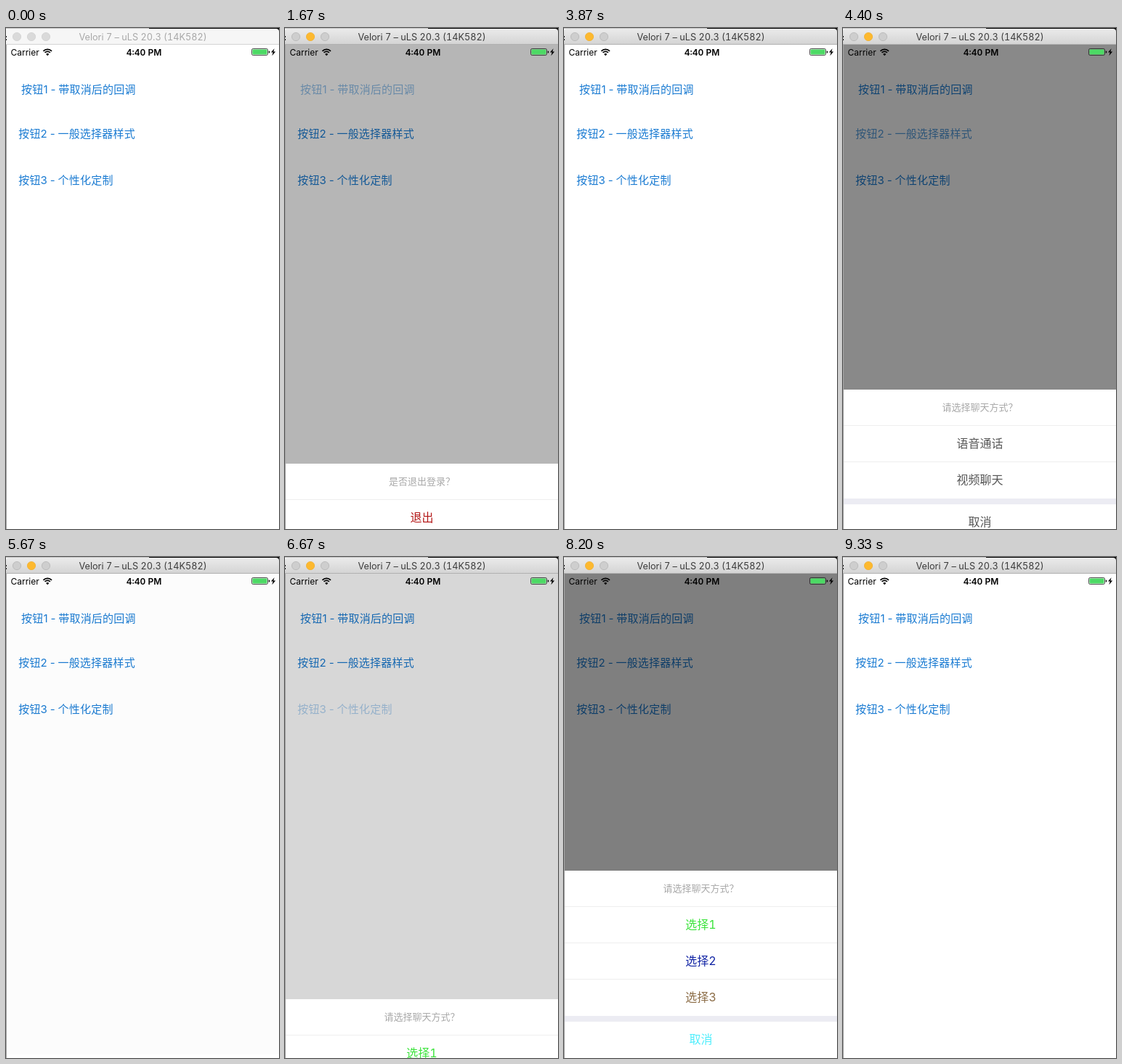
Recreate the animation shown at these times as an HTML page. Size 376 by 690 pixels, loop 9.39 s.

```html
<!DOCTYPE html>
<html lang="zh-CN">
<head>
<meta charset="utf-8">
<title>Action sheets</title>
<style>
html, body { margin: 0; width: 100%; height: 100%; overflow: hidden; background: #fff; }
svg { display: block; width: 376px; height: 690px; }
text { font-family: Inter, "Noto Sans CJK SC", "Noto Sans CJK", sans-serif; font-variant-numeric: tabular-nums; white-space: pre; }
.btn { font-size: 15px; fill: #1a7bd2; font-variant-numeric: normal; letter-spacing: 0.2px; word-spacing: -0.7px; }
.mid { text-anchor: middle; }
.head { font-size: 13px; fill: #a9a9a9; }
.row { font-size: 16px; }
</style>
</head>
<body>
<svg id="stage" viewBox="0 0 376 690" xmlns="http://www.w3.org/2000/svg">
  <defs>
    <linearGradient id="barOn" x2="0" y2="1">
      <stop offset="0" stop-color="#ebebeb"/><stop offset="1" stop-color="#d3d3d3"/>
    </linearGradient>
  </defs>
  <rect width="376" height="690" fill="#fff"/>

  <g id="buttons"></g>
  <rect id="dim" x="1" y="22" width="375" height="668" fill="#000" opacity="0"/>

  <g id="status">
    <text x="6.5" y="37.5" font-size="12">Carrier</text>
    <g fill="none" stroke="#000" stroke-width="1.7">
      <path d="M51.4 31.8a8.1 8.1 0 0 1 11.6 0"/>
      <path d="M53.5 34a5.2 5.2 0 0 1 7.4 0"/>
    </g>
    <path d="M57.2 38.2l-2.1-2.2a3 3 0 0 1 4.2 0z"/>
    <text class="mid" x="190" y="37.5" font-size="12" font-weight="600">4:40 PM</text>
    <rect x="338.5" y="28.5" width="22" height="9" rx="1.8" fill="none" stroke="#222" stroke-width="0.8"/>
    <rect x="339.5" y="29.5" width="20" height="7" rx="0.8" fill="#4cd964"/>
    <path d="M361.8 31.2q1.6.4 1.6 1.8t-1.6 1.8z"/>
    <path d="M369.6 28.2l-4.6 5.4h2.7l-1.3 4.6 4.8-5.8h-2.8z"/>
  </g>

  <g id="sheets"></g>

  <rect y="23" width="1" height="667" fill="#a6a6a6"/>
  <rect x="197" width="179" height="1" fill="#000"/>
  <rect x="368" width="8" height="6" fill="#000"/>
  <rect width="197" height="1" fill="#c4c4c4"/>
  <path id="bar" d="M0 23V5q0-4 4-4h368q4 0 4 4v18z"/>
  <path d="M0 11h1v2h-1zM0 15h1v2h-1z" fill="#222"/>
  <rect id="edge" y="22" width="376" height="1"/>
  <g id="dots"></g>
  <text id="caption" class="mid" x="188.5" y="16.7" font-size="12.7">Velori 7 – uLS 20.3 (14K582)</text>
</svg>
<script>
const LOOP = 9390, STEP = 1000 / 15;
const SLIDE = 300, FADE = 400, PRESS = 80, ACTIVE_AT = 1330;
const GREY = '#575757';
const $ = id => document.getElementById(id);

function add(parent, tag, attrs, text) {
  const el = document.createElementNS('http://www.w3.org/2000/svg', tag);
  for (const k in attrs) el.setAttribute(k, attrs[k]);
  if (text) el.textContent = text;
  parent.appendChild(el);
  return el;
}

const buttons = [
  [21, 90, '按钮1 - 带取消后的回调'],
  [17.2, 151, '按钮2 - 一般选择器样式'],
  [17.2, 215, '按钮3 - 个性化定制']
].map(([x, y, label]) => add($('buttons'), 'text', { class: 'btn', x, y }, label));

const dots = [15, 35, 55].map(cx => add($('dots'), 'circle', { cx, cy: 12, r: 5.6 }));

// Each sheet: opening time, closing time, heading, rows, cancel colour
const sheets = [
  { open: 1504, close: 2882, head: '是否退出登录？', rows: [['退出', '#b41919']], cancel: GREY },
  { open: 4158, close: 5400, head: '请选择聊天方式？', rows: [['语音通话', GREY], ['视频聊天', GREY]], cancel: GREY },
  { open: 6550, close: 8560, head: '请选择聊天方式？',
    rows: [['选择1', '#3be33b'], ['选择2', '#1023a4'], ['选择3', '#8a6b45']], cancel: '#4feefc' }
];

function buildSheet(s) {
  const gap = 50 + s.rows.length * 50;
  s.height = gap + 58;
  s.el = add($('sheets'), 'g');
  add(s.el, 'rect', { x: 1, width: 375, height: s.height, fill: '#fff' });
  add(s.el, 'text', { class: 'mid head', x: 188.5, y: 29.4 }, s.head);
  const row = (label, fill, y) =>
    add(s.el, 'text', { class: 'mid row', x: 188.5, y: y + 30.4, fill }, label);
  s.rows.forEach(([label, fill], i) => {
    const y = 50 + i * 50;
    add(s.el, 'rect', { x: 1, y: y - 1, width: 375, height: 1, fill: '#eee' });
    row(label, fill, y);
  });
  add(s.el, 'rect', { x: 1, y: gap, width: 375, height: 8, fill: '#ececf3' });
  row('取消', s.cancel, gap + 8);
}
sheets.forEach(buildSheet);

// cubic-bezier(.42, 0, .58, 1)
function ease(x) {
  if (x <= 0) return 0;
  if (x >= 1) return 1;
  let lo = 0, hi = 1, s = 0.5;
  for (let i = 0; i < 24; i++) {
    s = (lo + hi) / 2;
    const bx = 1.26 * s * (1 - s) ** 2 + 1.74 * s * s * (1 - s) + s ** 3;
    if (bx < x) lo = s; else hi = s;
  }
  return s * s * (3 - 2 * s);
}

function drawBar(on) {
  $('bar').setAttribute('fill', on ? 'url(#barOn)' : '#f6f6f6');
  $('edge').setAttribute('fill', on ? '#b1b1b1' : '#d4d4d4');
  $('caption').setAttribute('fill', on ? '#3c3c3c' : '#a8a8a8');
  dots.forEach((dot, i) => {
    const amber = on && i === 1;
    dot.setAttribute('fill', amber ? '#fdb92f' : on ? '#cecece' : '#dadada');
    dot.setAttribute('stroke', amber ? '#f0ae2c' : on ? '#b5b5b5' : '#d0d0d0');
    dot.setAttribute('stroke-width', 0.8);
  });
}

function render(t) {
  drawBar(t >= ACTIVE_AT);
  let shade = 0;
  sheets.forEach((s, i) => {
    const p = ease((t - s.open) / SLIDE) - ease((t - s.close) / SLIDE);
    shade = Math.max(shade, p);
    s.el.setAttribute('transform', `translate(0 ${Math.round(690 - s.height * p)})`);
    s.el.setAttribute('visibility', p > 0 ? 'visible' : 'hidden');
    const pressed = t >= s.open - PRESS;
    buttons[i].setAttribute('opacity', pressed ? 0.2 + 0.8 * ease((t - s.open) / FADE) : 1);
  });
  $('dim').setAttribute('opacity', shade / 2);
}

const start = performance.now();
function tick() {
  const t = (performance.now() - start) % LOOP;
  render(Math.floor((t + 4) / STEP) * STEP);
  requestAnimationFrame(tick);
}
tick();
</script>
</body>
</html>
```
